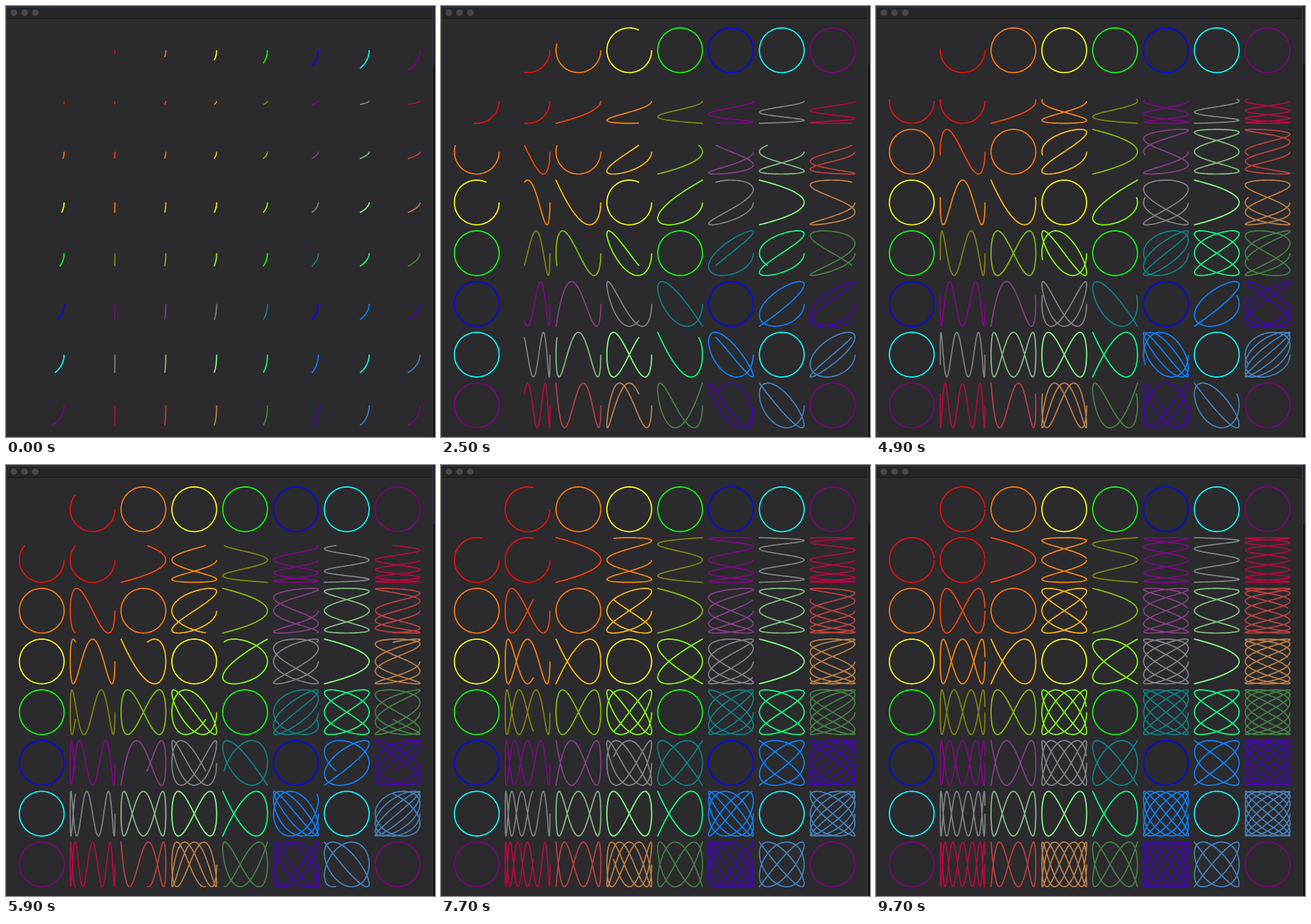
Recreate the animation shown at these times as an HTML page. Size 600x604 px, loop 9800 ms.

```html
<!DOCTYPE html>
<html lang="en">
<head>
<meta charset="utf-8">
<title>Lissajous table</title>
<style>
  html, body { margin: 0; width: 100%; height: 100%; overflow: hidden; background: #2b2a2d; }
  svg { display: block; width: 600px; height: 604px; }
</style>
</head>
<body>
<svg id="stage" viewBox="0 0 600 604">
  <rect width="600" height="604" fill="#2b2a2d"/>
  <rect width="597" height="17" fill="#262526"/>
  <rect y="17" width="597" height="1" fill="#1b1a1b"/>
  <rect width="600" height="1" fill="#202635"/>
  <rect y="1" width="597" height="1" fill="#343d50"/>
  <rect y="2" width="1" height="602" fill="#3a3b40"/>
  <rect x="596" y="2" width="1" height="602" fill="#39393c"/>
  <rect x="597" y="1" width="3" height="81" fill="#20242f"/>
  <rect x="597" y="82" width="3" height="522" fill="#141416"/>
  <g fill="#484648">
    <circle cx="11" cy="9.3" r="4.6"/>
    <circle cx="26" cy="9.3" r="4.6"/>
    <circle cx="41" cy="9.3" r="4.6"/>
  </g>
  <g id="curves" fill="none" stroke-width="1.7" stroke-linejoin="round"></g>
</svg>
<script>
const LOOP = 9800, TICK = 100;
const START = 9, STEP = 3.583;      // degrees of the base angle
const X0 = 50, Y0 = 62, GAP = 71.1, R = 31.3;
const COLORS = [
  [240, 12, 6], [255, 124, 8], [255, 255, 20], [16, 255, 16],
  [8, 6, 255], [10, 255, 255], [124, 4, 124]
];
const layer = document.getElementById('curves');
const curves = [];

function mix(a, b) {
  return `rgb(${a.map((v, i) => Math.round((v + b[i]) / 2))})`;
}

// The first row and column hold plain circles that drive the rest.
for (let row = 0; row < 8; row++) {
  for (let col = 0; col < 8; col++) {
    if (!row && !col) continue;
    const fx = col || row, fy = row || col;
    const path = document.createElementNS('http://www.w3.org/2000/svg', 'path');
    path.setAttribute('stroke', mix(COLORS[fx - 1], COLORS[fy - 1]));
    layer.append(path);
    curves.push({ path, fx, fy, cx: X0 + GAP * col, cy: Y0 + GAP * row });
  }
}

function trace({ fx, fy, cx, cy }, angle) {
  const end = fx === fy ? Math.min(angle, 360 / fx) : angle;
  const count = Math.ceil(end * Math.max(fx, fy) / 5);
  let d = '';
  for (let i = 0; i <= count; i++) {
    const a = end * i / count * Math.PI / 180;
    const x = cx + R * Math.cos(fx * a), y = cy + R * Math.sin(fy * a);
    d += (i ? 'L' : 'M') + x.toFixed(2) + ' ' + y.toFixed(2);
  }
  return d;
}

let shown = -1;
function draw(time) {
  const tick = Math.floor(time % LOOP / TICK);
  if (tick === shown) return;
  shown = tick;
  const angle = START + STEP * tick;
  for (const c of curves) c.path.setAttribute('d', trace(c, angle));
}

const begin = performance.now();
function loop() {
  draw(performance.now() - begin);
  requestAnimationFrame(loop);
}
loop();
</script>
</body>
</html>
```
